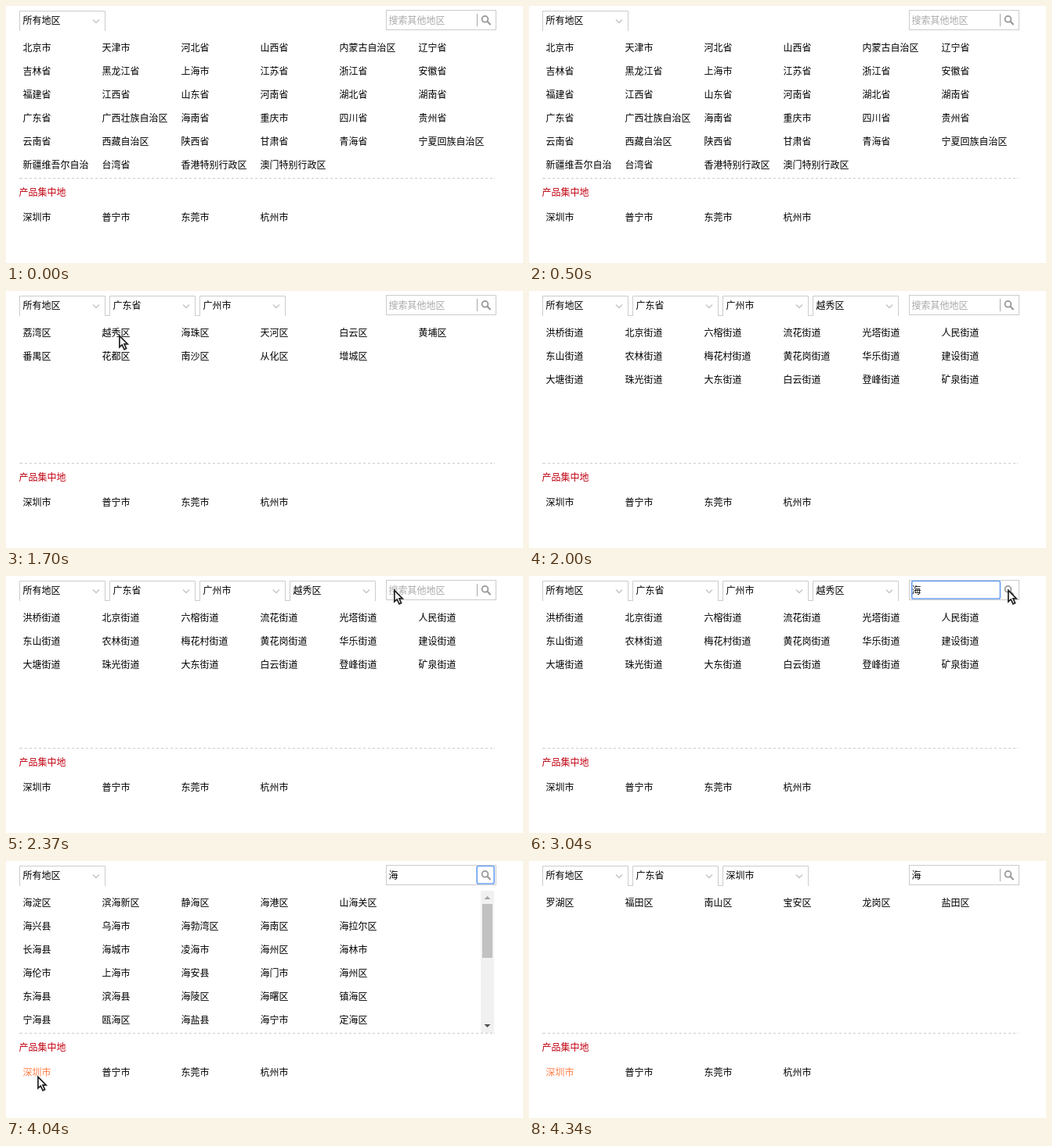
Animation of 660x329 px, one loop 5.01 s. Source, as an HTML page:

```html
<!DOCTYPE html>
<html lang="zh-CN">
<head>
<meta charset="utf-8">
<title>地区选择</title>
<style>
html, body { margin: 0; width: 100%; height: 100%; overflow: hidden; background: #fff; }
svg { display: block; }
text { font: 500 12px "Noto Sans CJK SC", "Noto Sans CJK", sans-serif; white-space: pre; }
</style>
</head>
<body>
<svg id="stage" width="660" height="329"></svg>
<script>
const stage = document.getElementById('stage');
const LOOP = 5010;

const provinces = `北京市 天津市 河北省 山西省 内蒙古自治区 辽宁省
吉林省 黑龙江省 上海市 江苏省 浙江省 安徽省
福建省 江西省 山东省 河南省 湖北省 湖南省
广东省 广西壮族自治区 海南省 重庆市 四川省 贵州省
云南省 西藏自治区 陕西省 甘肃省 青海省 宁夏回族自治区
新疆维吾尔自治 台湾省 香港特别行政区 澳门特别行政区`;
const cities = `广州市 韶关市 深圳市 珠海市 汕头市 佛山市
江门市 湛江市 茂名市 肇庆市 惠州市 梅州市
汕尾市 河源市 阳江市 清远市 东莞市 中山市
潮州市 揭阳市 云浮市`;
const guangzhou = `荔湾区 越秀区 海珠区 天河区 白云区 黄埔区
番禺区 花都区 南沙区 从化区 增城区`;
const streets = `洪桥街道 北京街道 六榕街道 流花街道 光塔街道 人民街道
东山街道 农林街道 梅花村街道 黄花岗街道 华乐街道 建设街道
大塘街道 珠光街道 大东街道 白云街道 登峰街道 矿泉街道`;
const results = `海淀区 滨海新区 静海区 海港区 山海关区
海兴县 乌海市 海勃湾区 海南区 海拉尔区
长海县 海城市 凌海市 海州区 海林市
海伦市 上海市 海安县 海门市 海州区
东海县 滨海县 海陵区 海曙区 镇海区
宁海县 瓯海区 海盐县 海宁市 定海区`;
const shenzhen = '罗湖区 福田区 南山区 宝安区 龙岗区 盐田区';
const hubs = '深圳市 普宁市 东莞市 杭州市';

const path = '所有地区 广东省 广州市 越秀区'.split(' ');

// Each step overrides the previous one; the cursor shows only where given.
const steps = [
  { at: 0, tabs: path.slice(0, 1), list: provinces, query: '', focus: '', hot: false },
  { at: 200, cursor: [40, 144] },
  { at: 500 },
  { at: 670, tabs: path.slice(0, 2), list: cities },
  { at: 1140, cursor: [40, 54] },
  { at: 1370, tabs: path.slice(0, 3), list: guangzhou },
  { at: 1700, cursor: [144, 56] },
  { at: 2000, tabs: path, list: streets },
  { at: 2370, cursor: [495, 17] },
  { at: 2670, query: '海', focus: 'input' },
  { at: 3040, cursor: [611, 17] },
  { at: 3340, tabs: path.slice(0, 1), list: results, focus: 'button' },
  { at: 4040, hot: true, cursor: [40, 275] },
  { at: 4340, tabs: [path[0], path[1], '深圳市'], list: shenzhen, focus: '' }
];
steps.forEach((s, i) => { steps[i] = { ...steps[i - 1], cursor: null, ...s }; });

const text = (x, y, str, fill = '#000') => `<text x="${x - .5}" y="${y}" fill="${fill}">${str}</text>`;
const line = (d, color, extra = '') => `<path d="${d}" fill="none" stroke="${color}" ${extra}/>`;
const rect = (x, y, w, h, attrs) => `<rect x="${x}" y="${y}" width="${w}" height="${h}" ${attrs}/>`;

const grid = (list, top, fill) => list.split('\n').map((row, r) =>
  row.split(' ').map((name, c) => text(22 + 101 * c, top + 30 * r, name, fill && fill(c))).join('')).join('');

function tab(name, i) {
  const x = 17 + 115 * i;
  const joint = i ? line(`M${x - 5} 31.5H${x}`, '#ccc') : '';
  return joint + line(`M${x + .5} 32V6.5H${x + 109.5}V32`, '#ccc') + text(x + 5, 23, name) +
    line(`M${x + 94} 17.5l4 4l4 -4`, '#c4c4c4', 'stroke-width="1.4"');
}

const ring = (x, w) => rect(x, 6.5, w, 22.5, 'rx="2" fill="none" stroke="#6ea3f5" stroke-width="1.7"');

function search({ query, focus }) {
  return rect(485.5, 5.5, 140, 25, 'fill="#fff" stroke="#ccc"') +
    text(489, 23, query || '搜索其他地区', query ? '#000' : '#aaa') +
    line('M601.5 10V26', '#aaa') +
    '<circle cx="611.5" cy="16.8" r="3.9" fill="none" stroke="#999" stroke-width="1.8"/>' +
    line('M614.5 19.8L618.6 24', '#999', 'stroke-width="2.2"') +
    (focus === 'input' ? ring(488.7, 112.8) : focus === 'button' ? ring(601.2, 22) : '');
}

const scrollbar = () => rect(606, 38, 17, 182, 'fill="#f1f1f1"') +
  rect(608, 55, 13, 69, 'fill="#c1c1c1"') +
  '<path d="M610.5 49l4 -4l4 4z" fill="#a3a3a3"/><path d="M610.5 209l4 4l4 -4z" fill="#505050"/>';

// Dashes between two solid end pixels.
const divider = () => line('M18 220.5H623', '#ccc', 'stroke-dasharray="3 3"') +
  line('M17 220.5h1M623 220.5h1', '#ccc');

const pointer = ([x, y]) => `<path transform="translate(${x} ${y})" fill="#fff" stroke="#222"
  stroke-width="1.7" d="M.9 1.4V15.8L4.2 12.8L7 18.8L9.6 17.6L7 11.8H11.2Z"/>`;

const render = s => s.tabs.map(tab).join('') + search(s) + grid(s.list, 58) +
  (s.list === results ? scrollbar() : '') +
  divider() +
  text(17, 243, '产品集中地', '#c00010') +
  grid(hubs, 275, c => s.hot && c === 0 ? '#ff7f48' : '#000') +
  (s.cursor ? pointer(s.cursor) : '');

let shown;
function tick() {
  const t = performance.now() % LOOP;
  const step = steps.findLast(s => s.at <= t);
  if (step !== shown) stage.innerHTML = render(shown = step);
  requestAnimationFrame(tick);
}
tick();
</script>
</body>
</html>
```
